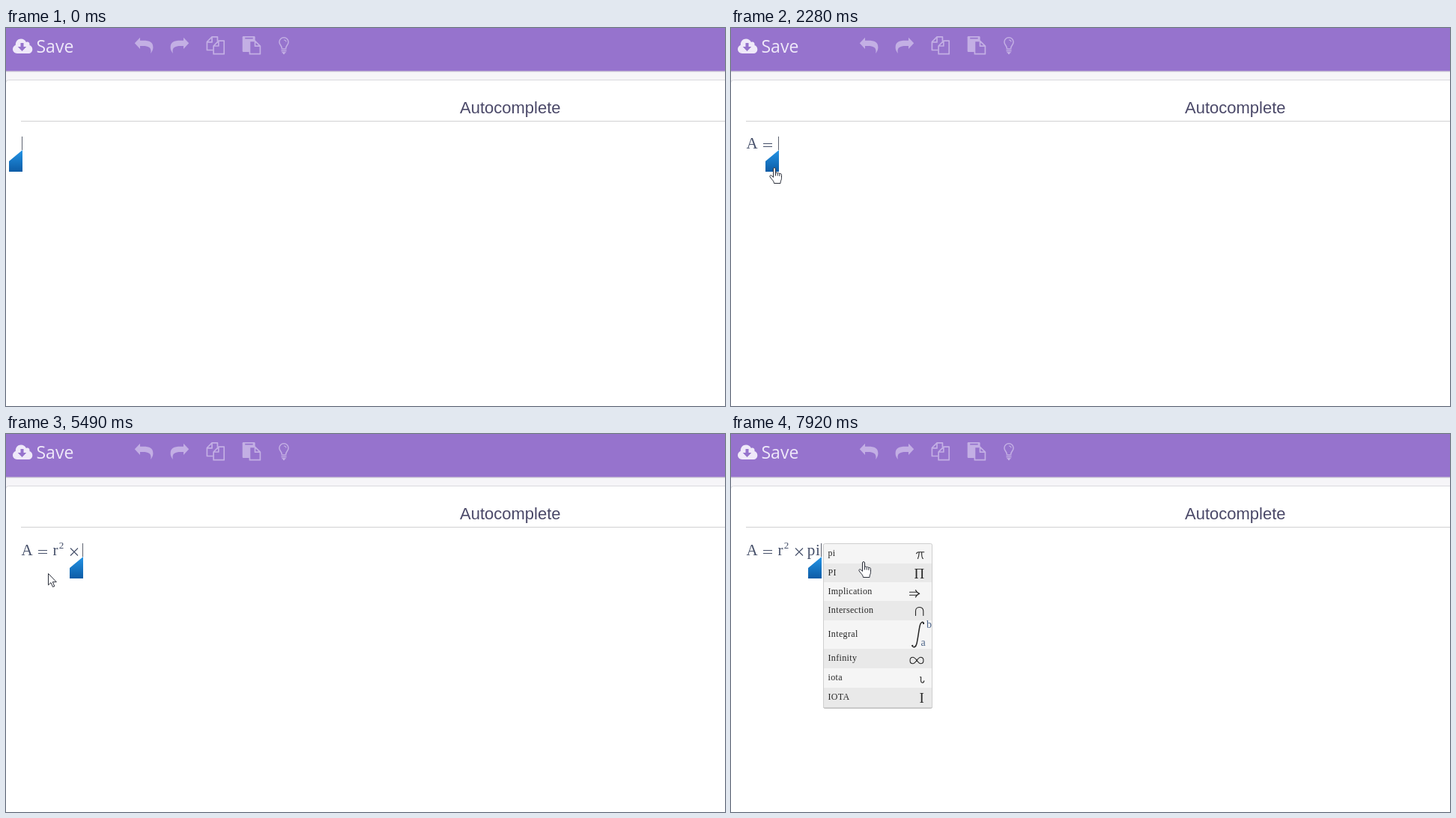
An HTML page for the animation above (7990 ms loop, 960 by 505 pixels).

```html
<!DOCTYPE html>
<html lang="en">
<head>
<meta charset="utf-8">
<title>Autocomplete</title>
<style>
  html, body { margin: 0; width: 100%; height: 100%; overflow: hidden; background: #fff; }
  svg { display: block; width: 960px; height: 505px; }
  .save { font: 23px "Open Sans", "Noto Sans", sans-serif; fill: #efe9f9; }
  .title { font: 22px "Liberation Sans", Arial, sans-serif; fill: #4a4868; }
  .math { font: 21px "Liberation Serif", serif; fill: #46506a; }
  .icon { fill: #c3afe4; }
  .line { fill: none; stroke: #c3afe4; stroke-width: 1.7; stroke-linejoin: round; }
  .label { font: 12px "Liberation Serif", serif; letter-spacing: .35px; fill: #262626; }
  .sym { font: 19px "Liberation Serif", serif; fill: #262626; }
  .bound { font: 14px "Liberation Serif", serif; fill: #4c6488; }
  .ink { fill: none; stroke: #262626; stroke-width: 1.1; stroke-linecap: round; stroke-linejoin: round; }
  .pointer path { fill: #fff; stroke: #2b2f3a; stroke-linejoin: round; }
</style>
</head>
<body>
<svg viewBox="0 0 960 505">
  <defs>
    <linearGradient id="blue" x1="0" y1="0" x2="0" y2="1">
      <stop offset="0" stop-color="#2394e6"/>
      <stop offset="1" stop-color="#0d5ca6"/>
    </linearGradient>
    <path id="redo" d="M237 12.8L244.2 20.3 237 27.9V24H233C226 24 222.5 26 222.5 31L222.8 34C220.5 31 219.6 28.5 219.6 26C219.6 19 224 16.8 233 16.8H237Z"/>
  </defs>

  <!-- Toolbar -->
  <rect width="960" height="505" fill="#fff"/>
  <rect y="57" width="960" height="13" fill="#f6f5f8"/>
  <rect width="960" height="57" fill="#9673cd"/>
  <rect y="57" width="960" height="1" fill="#b9a9d2"/>
  <rect y="58" width="960" height="1" fill="#dcd9e2"/>
  <rect x="-.5" y="69.5" width="970" height="450" rx="4" fill="#fff" stroke="#dadade"/>

  <path fill="#efe9f9" d="M15 34C11.500 34 9 31.500 9 28.300C9 25.700 10.500 23.600 12.800 22.700C12.500 18 15.800 14.500 20 14.500C23.200 14.500 25.700 16.200 26.900 19C29.600 17.700 32.200 19.800 31.500 23C33.700 23.700 35.300 25.900 35.300 28.400C35.300 31.500 32.900 34 29.700 34Z"/>
  <path fill="#9673cd" d="M19.500 20H23.500V25H27.200L21.500 31 15.800 25H19.500Z"/>
  <text class="save" x="40.500" y="33">Save</text>

  <use class="icon" href="#redo"/>
  <use class="icon" href="#redo" transform="translate(416) scale(-1 1)"/>
  <g class="line" transform="translate(267.500 11)">
    <path d="M14.900 6.500V.900H7.500L.900 7.500V18.500H9M7.500 .900V7.900H.900"/>
    <path d="M9.600 13L16.300 6.100H23.700V23.700H9.600ZM16.300 6.100V13H9.600"/>
  </g>
  <g transform="translate(315.700 11)">
    <rect class="icon" width="16.900" height="21" rx="1.300"/>
    <rect x="3.500" y="1.800" width="10.500" height="1.700" fill="#9673cd"/>
    <path class="line" style="fill:#9673cd" d="M9.700 6.400H16.800L23.700 13.200V23.700H9.700ZM16.800 6.400V13.200H23.700"/>
  </g>
  <g class="line" style="stroke-width:1.5">
    <path d="M368.300 27C368.300 23.500 364.900 22.500 364.900 18.800C364.900 15.200 367.700 12.800 371 12.800S377.100 15.200 377.100 18.800C377.100 22.500 373.700 23.500 373.700 27"/>
    <path d="M371 16C372.700 16 374 17 374 18.500" style="stroke-width:1.100"/>
    <path d="M367.500 28H374.500M367.500 30.500H374.500M368.500 32.800H373.500M370 34.300H372"/>
  </g>

  <text class="title" x="606" y="114">Autocomplete</text>
  <rect x="20" y="124" width="940" height="1" fill="#d0d0d2"/>

  <!-- Formula -->
  <g id="formula" class="math">
    <text x="20.500" y="161" data-t="1520">A</text>
    <path data-t="2280" d="M43 154.500H55M43 158.500H55" stroke="#46506a"/>
    <text x="62.500" y="161" data-t="2670">r</text>
    <text x="70.800" y="152" font-size="13" data-t="3550" style="font-size:13px">2</text>
    <path data-t="5400" d="M86 151.500L96 161.500M96 151.500L86 161.500" stroke="#46506a" stroke-width="1.100"/>
    <text x="101.800" y="161" data-t="6570">p</text>
    <text x="113" y="161" data-t="6660">i</text>
  </g>
  <g id="caret">
    <rect id="bar" width="1" fill="#5d6270"/>
    <path id="mark" d="M1 0V29H-17V15Z" fill="url(#blue)"/>
  </g>

  <!-- Suggestions -->
  <g id="menu" data-t="7180">
    <rect x="123.500" y="147.500" width="145" height="219" rx="2" fill="#bbb" stroke="#c2c2c2"/>
    <rect x="123.500" y="146.500" width="145" height="219" rx="2" fill="#f5f5f5" stroke="#cfcfcf"/>
    <g id="rows"></g>
    <g class="ink">
      <path d="M247.500 159.800C248.500 157.600 249.500 157.800 251 157.800H257.800M251.200 158C251 162 250.500 164.500 249.500 166.500M254.700 158C254.500 162 254.500 165 256.300 166.500"/>
      <path d="M238.500 211.200H249M238.500 215.200H249M246.500 208.500C247.500 211 249 212.500 251.800 213.200C249 214 247.500 215.500 246.500 218"/>
      <path d="M246.500 242.500V236.500C246.500 229.800 256.800 229.800 256.800 236.500V242.500"/>
      <path d="M257.300 252.800C256.300 250.200 253.200 251 252.200 256C250.800 262 249.800 272 248 280C246.800 285 243.600 286 242 283" stroke-width="1.500"/>
      <circle cx="257" cy="253" r=".6"/><circle cx="242.300" cy="282.800" r=".6"/>
      <path d="M248.200 302.500C245.500 298.800 244.200 298.200 242.800 298.200C237.800 298.200 237.800 306.800 242.800 306.800C247 306.800 249 298.200 253.200 298.200C258.200 298.200 258.200 306.800 253.200 306.800C251.800 306.800 250.800 306.200 248.200 302.500Z"/>
      <path d="M252.500 324.800H253.800C253.500 328 253 332.200 255.200 332.200C256.800 332.200 257.600 331 257.800 329.800"/>
    </g>
    <g class="sym">
      <text x="244.500" y="192.500">Π</text>
      <text x="251.500" y="358.500">I</text>
    </g>
    <g class="bound">
      <text x="261" y="258.500">b</text>
      <text x="253.500" y="283">a</text>
    </g>
  </g>

  <g id="arrow" class="pointer">
    <path d="M.5 .500V15.800L4 12.600 6.500 18.300 8.800 17.300 6.300 11.700H11.300Z"/>
  </g>
  <g id="hand" class="pointer">
    <path d="M5.500 13.500V2C5.500 .200 8.500 .200 8.500 2V8C8.500 6.600 11.200 6.800 11.200 8.300C11.500 7.200 13.700 7.400 13.900 9C14.500 8 16.500 8.400 16.500 10.300V14.500C16.500 17 15 18 15 21.500H6.500C6.500 18.500 3 16 1 12.800C0 11 2.500 10.200 3.600 11.400Z"/>
    <path d="M8.500 8V11.500M11.200 8.500V11.500M13.900 9V12" style="fill:none"/>
  </g>
</svg>
<script>
  const LOOP = 7990;
  const $ = id => document.getElementById(id);

  // Menu rows: label, top, height
  const rows = [
    ["pi", 147, 26], ["PI", 173, 25], ["Implication", 198, 25], ["Intersection", 223, 26],
    ["Integral", 249, 38], ["Infinity", 287, 26], ["iota", 313, 26], ["IOTA", 339, 26]
  ];
  $("rows").innerHTML = rows.map(([label, y, h], i) =>
    (i % 2 ? `<rect x="124" y="${y}" width="144" height="${h}" fill="#e9e9e9"/>` : "") +
    `<text class="label" x="129.500" y="${Math.round(y + h / 2 + 3.4)}">${label}</text>`
  ).join("");

  // Caret: time, x, top, height (no x = hidden)
  const caretSteps = [
    [0, 21, 145, 18], [780], [1360, 21, 145, 18], [1520, 37, 145, 18], [2280, 63, 145, 18],
    [2670, 72, 145, 18], [3060, 71, 146, 12], [3550, 78, 142, 16], [4530, 81, 146, 18],
    [5400, 102, 146, 18], [6570, 113, 146, 18], [6660, 120, 146, 18]
  ];
  // Pointer: time, shape, x, y
  const pointerSteps = [
    [0], [180, "arrow", 458, 338], [252, "arrow", 365, 268], [324, "arrow", 240, 215],
    [396, "arrow", 132, 190], [468, "arrow", 66, 187], [540, "arrow", 38, 206],
    [700, "arrow", 82, 198], [780, "arrow", 55, 186], [2280, "hand", 51, 186],
    [4530, "hand", 52, 186], [5490, "arrow", 56, 186], [7580, "arrow", 66, 186],
    [7665, "arrow", 92, 182], [7750, "hand", 128, 176], [7835, "hand", 157, 171],
    [7920, "hand", 170, 170]
  ];

  const timed = [...document.querySelectorAll("[data-t]")];
  const at = (steps, t) => steps.findLast(s => s[0] <= t);
  const show = (el, on) => el.setAttribute("visibility", on ? "visible" : "hidden");
  const move = (el, x, y) => el.setAttribute("transform", `translate(${x} ${y})`);

  function draw(t) {
    for (const el of timed) show(el, t >= +el.dataset.t);
    move($("formula"), 0, t >= 3060 ? 1 : 0);

    const [, x, top, h] = at(caretSteps, t);
    show($("caret"), x !== undefined);
    if (x !== undefined) {
      move($("caret"), x, top);
      $("bar").setAttribute("height", h);
      move($("mark"), 0, h);
    }

    const [, shape, px, py] = at(pointerSteps, t);
    for (const id of ["arrow", "hand"]) show($(id), id === shape);
    if (shape) move($(shape), px, py);
  }

  const start = performance.now();
  function tick() {
    draw((performance.now() - start) % LOOP);
    requestAnimationFrame(tick);
  }
  tick();
</script>
</body>
</html>
```
